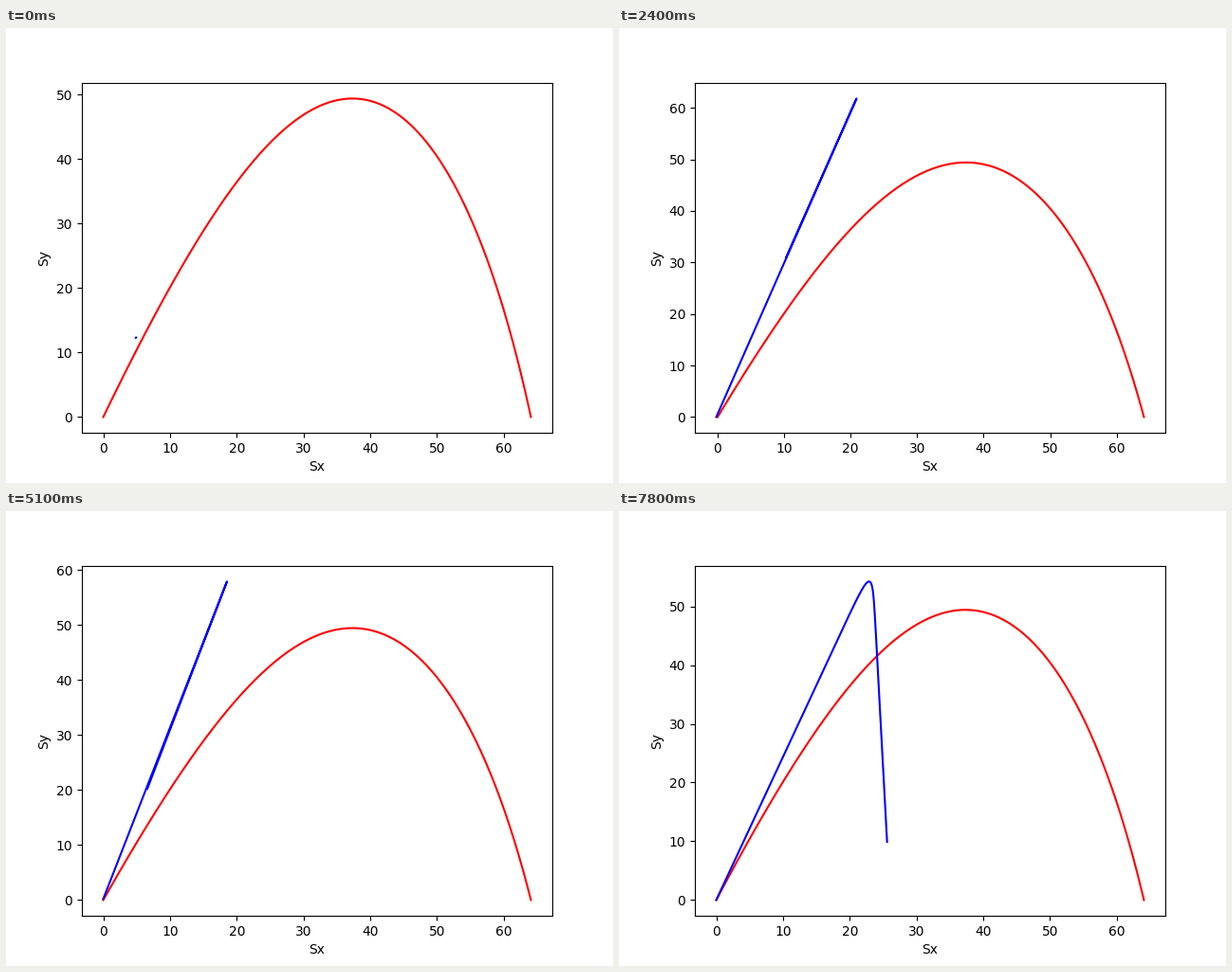
Recreate the animation shown at these times as a matplotlib script. Size 640 px wide and 480 px high, loop 8 s.

```python
import math

import numpy as np
import matplotlib.pyplot as plt
from matplotlib.animation import FuncAnimation

INTERVAL = 100
FRAMES = 80
FRAMES_PER_STEP = 3

GRAVITY, SPEED, ANGLE = 9.81, 50, math.radians(65)
RANGE = 64.09


def flight(drag, dt=0.02):
    """Path of a projectile with quadratic drag, as complex x + iy, until it lands."""
    def acceleration(v):
        return -1j * GRAVITY - drag * abs(v) * v

    velocity = SPEED * complex(math.cos(ANGLE), math.sin(ANGLE))
    path = [0j]
    while path[-1].imag >= 0:
        middle = velocity + acceleration(velocity) * dt / 2
        path.append(path[-1] + middle * dt)
        velocity += acceleration(middle) * dt
    above, below = path[-2:]
    path[-1] = above + (below - above) * above.imag / (above.imag - below.imag)
    return np.array(path)


def drag_for_range(distance, low=0.008, high=0.016):
    for _ in range(25):
        middle = (low + high) / 2
        if flight(middle)[-1].real > distance:
            low = middle
        else:
            high = middle
    return low


# step: start, corner, end of the bent stroke
POSES = {
    0: [4.88 + 12.28j, 4.92 + 12.33j, 4.92 + 12.33j],
    3: [0.5 + 0.6j, 19.15 + 44.9j, 19.15 + 44.9j],
    8: [-0.2, 20.9 + 61.85j, 10.3 + 31j],
    13: [0, 18.85 + 57.12j, 6.4 + 19.3j],
    17: [0.2j, 18.55 + 57.9j, 6.6 + 20.2j],
    23: [0.4 + 1.6j, 17.6 + 58.9j, 6.5 + 22.6j],
    26: [0, 23.37 + 57j, 25.6 + 9.9j],
}
ROUNDING_STEPS, ROUNDING = (23, 26), (0.0005, 0.0386)


def pose(step):
    """Two straight runs that meet in a softly rounded corner."""
    start, corner, end = (np.interp(step, list(POSES), points)
                          for points in zip(*POSES.values()))
    soft = np.interp(step, ROUNDING_STEPS, ROUNDING)
    s = np.linspace(-1, 1, 401)
    rise = soft * np.logaddexp(0, -s / soft)
    fall = soft * np.logaddexp(0, s / soft)
    return corner + (start - corner) * rise + (end - corner) * fall


fig, ax = plt.subplots(figsize=(6.4, 4.8), dpi=100)
ax.set_xlabel("Sx")
ax.set_ylabel("Sy")
path = flight(drag_for_range(RANGE))
ax.plot(path.real, path.imag, "r")
guess, = ax.plot([], [], "b")


def update(frame):
    points = pose(frame // FRAMES_PER_STEP)
    guess.set_data(points.real, points.imag)
    ax.relim()
    ax.autoscale_view()
    return guess,


anim = FuncAnimation(fig, update, frames=FRAMES, interval=INTERVAL,
                     repeat=True, repeat_delay=0)
plt.show()
```
